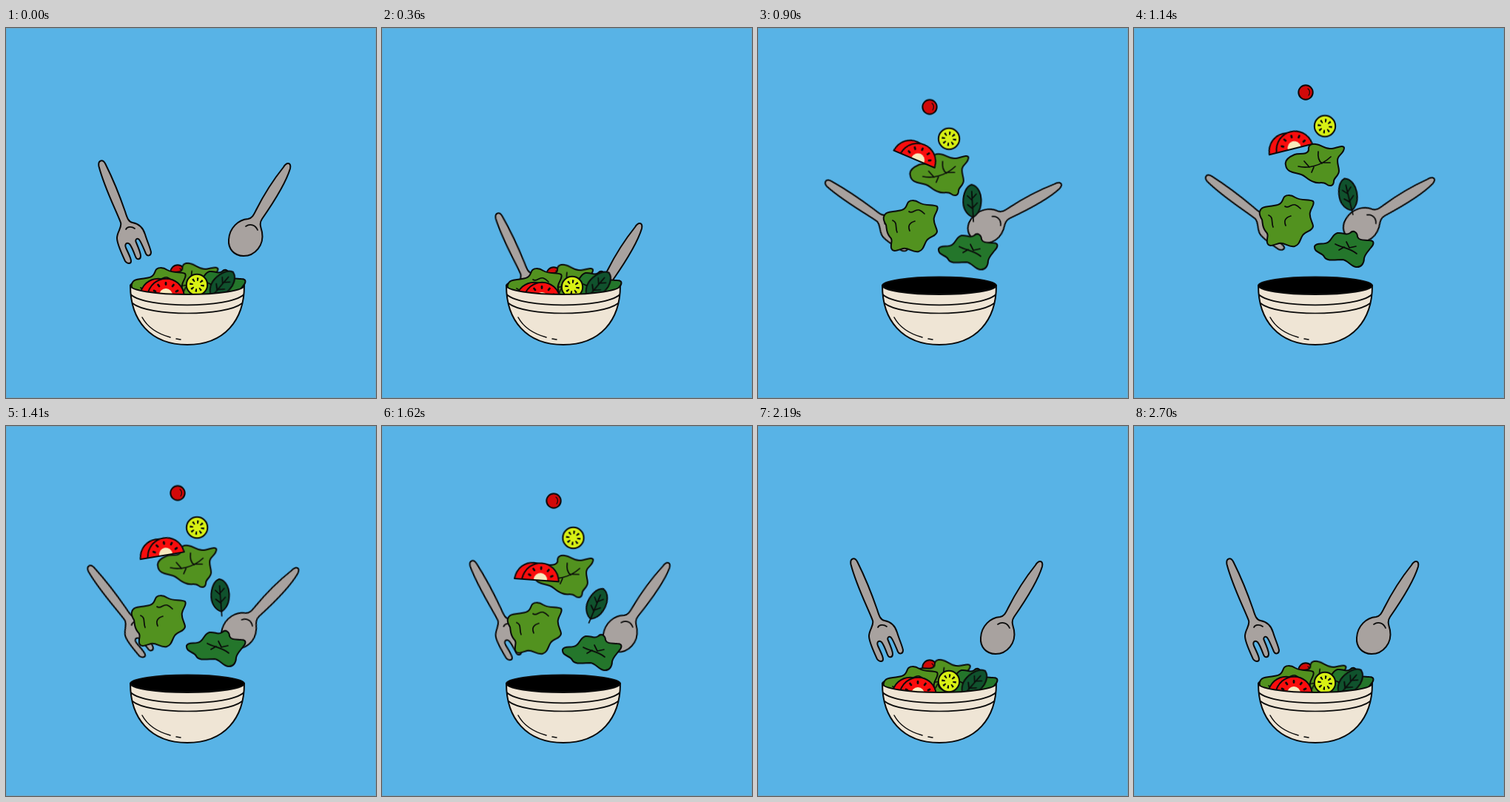
An HTML page for the animation above (2730 ms loop, 500x500 px).

```html
<!DOCTYPE html>
<html lang="en">
<head>
<meta charset="utf-8">
<title>Salad toss</title>
<style>
  html, body { margin: 0; width: 100%; height: 100%; overflow: hidden; background: #58b3e6; }
  svg { display: block; width: 100vw; height: 100vh; }
  .ink { stroke: #0a0a0a; stroke-width: 2; stroke-linejoin: round; stroke-linecap: round; }
  .line { fill: none; stroke-width: 1.7; }
  .steel { fill: #a8a29f; }
  .lettuce { fill: #52921f; }

  #fork { transform-origin: 127px 180px; animation: fork 2730ms infinite; }
  #spoon { transform-origin: 384px 183px; animation: spoon 2730ms infinite; }

  @keyframes fork {
    0% { transform: translate(0, 0) rotate(0deg); animation-timing-function: cubic-bezier(.4, 0, .65, .95); }
    13.19% { transform: translate(28px, 71px) rotate(-3deg); animation-timing-function: ease-in-out; }
    19.78% { transform: translate(27px, 69px) rotate(-8deg); animation-timing-function: cubic-bezier(.3, .1, .6, .8); }
    26.37% { transform: translate(-22px, 44px) rotate(-34deg); animation-timing-function: cubic-bezier(.2, .5, .5, 1); }
    32.97% { transform: translate(-36px, 28px) rotate(-34deg); animation-timing-function: cubic-bezier(.5, 0, .7, .55); }
    41.76% { transform: translate(-30px, 21px) rotate(-31deg); animation-timing-function: cubic-bezier(.35, .25, .65, .85); }
    59.34% { transform: translate(-7px, 3px) rotate(-6deg); animation-timing-function: ease-out; }
    65%, 100% { transform: translate(0, 0) rotate(0deg); }
  }
  @keyframes spoon {
    0% { transform: translate(0, 0) rotate(0deg); animation-timing-function: cubic-bezier(.4, 0, .65, .95); }
    13.19% { transform: translate(-33px, 81px) rotate(0deg); animation-timing-function: ease-in-out; }
    19.78% { transform: translate(-32px, 79px) rotate(6deg); animation-timing-function: cubic-bezier(.3, .1, .6, .8); }
    26.37% { transform: translate(13px, 47px) rotate(29deg); animation-timing-function: cubic-bezier(.2, .5, .5, 1); }
    32.97% { transform: translate(27px, 28px) rotate(30deg); animation-timing-function: cubic-bezier(.5, 0, .7, .55); }
    41.76% { transform: translate(23px, 21px) rotate(27deg); animation-timing-function: cubic-bezier(.35, .25, .65, .85); }
    59.34% { transform: translate(5px, 2px) rotate(4deg); animation-timing-function: ease-out; }
    65%, 100% { transform: translate(0, 0) rotate(0deg); }
  }

  /* One toss for all food; each piece brings its own poses. */
  .food { --end: var(--rest); animation: toss 2730ms infinite; }
  @keyframes toss {
    0% { transform: var(--rest); animation-timing-function: ease-in-out; }
    13.19% { transform: var(--dip); animation-timing-function: linear; }
    19.78% { transform: var(--dip); animation-timing-function: cubic-bezier(.3, .1, .65, .75); }
    26.37% { transform: var(--up); animation-timing-function: cubic-bezier(.2, .55, .45, 1); }
    41.76% { transform: var(--top); animation-timing-function: cubic-bezier(.5, 0, .92, .6); }
    59.34% { transform: var(--hang); animation-timing-function: cubic-bezier(.4, .12, .75, .57); }
    67.03% { transform: var(--drop); animation-timing-function: cubic-bezier(.3, .4, .7, .9); }
    72.53% { transform: var(--land); animation-timing-function: ease-in-out; }
    79.12% { transform: var(--hop); animation-timing-function: ease-in-out; }
    93.41%, 100% { transform: var(--end); }
  }
  #cherry {
    --rest: translate(232px, 330px);
    --dip: translate(232px, 333px);
    --up: translate(232px, 173.500px);
    --top: translate(232px, 87px);
    --hang: translate(232px, 101px);
    --drop: translate(233px, 181px);
    --land: translate(233px, 334px);
    --hop: translate(232px, 326px);
  }
  #mid {
    --rest: translate(244px, 345px) rotate(4deg);
    --dip: translate(243px, 347px) rotate(3deg);
    --up: translate(246px, 243px) rotate(-3deg);
    --top: translate(243px, 184px) rotate(0deg);
    --hang: translate(244px, 202px) rotate(1deg);
    --drop: translate(244px, 318px) rotate(-8deg);
    --land: translate(244px, 349px) rotate(2deg);
    --hop: translate(244px, 343px) rotate(5deg);
  }
  #left {
    --rest: translate(207px, 360px);
    --dip: translate(207px, 361px);
    --up: translate(207px, 293px);
    --top: translate(207px, 262px);
    --hang: translate(207px, 274.500px);
    --drop: translate(206px, 366px);
    --land: translate(207px, 358px);
    --hop: translate(207px, 361px);
  }
  #dark {
    --rest: translate(285px, 351px);
    --dip: translate(285px, 353px);
    --up: translate(285px, 314px);
    --top: translate(285px, 299px);
    --hang: translate(285px, 306px);
    --drop: translate(285px, 352px);
    --land: translate(285px, 350px);
    --hop: translate(285px, 352px);
  }
  #spinach {
    --rest: translate(292px, 346px) rotate(42deg);
    --dip: translate(292px, 347px) rotate(42deg);
    --up: translate(290px, 263px) rotate(33deg);
    --top: translate(289px, 225px) rotate(-12deg);
    --hang: translate(290px, 240px) rotate(24deg);
    --drop: translate(292px, 348px) rotate(35deg);
    --land: translate(292px, 345px) rotate(40deg);
    --hop: translate(292px, 347px) rotate(43deg);
  }
  #lime {
    --rest: translate(258px, 347px);
    --dip: translate(257px, 350px);
    --up: translate(258.500px, 208px);
    --top: translate(258px, 132.500px);
    --hang: translate(258.500px, 151px);
    --drop: translate(258px, 268px);
    --land: translate(258px, 351px);
    --hop: translate(258px, 345px);
  }
  #tomato {
    --rest: translate(211px, 362px) rotate(0deg);
    --dip: translate(211px, 367px) rotate(0deg);
    --up: translate(208px, 222px) rotate(-212deg);
    --top: translate(212px, 164px) rotate(-374deg);
    --hang: translate(209px, 208px) rotate(-356deg);
    --drop: translate(211px, 366px) rotate(-360deg);
    --land: translate(211px, 361px) rotate(-360deg);
    --hop: translate(211px, 363px) rotate(-360deg);
    --end: translate(211px, 362px) rotate(-360deg);
  }
</style>
</head>
<body>
<svg viewBox="0 0 500 500" class="ink">
  <rect x=".5" y=".5" width="499" height="499" fill="none" style="stroke:#6ba8c9;stroke-width:1"/>
  <ellipse cx="245" cy="348" rx="77" ry="11.5" fill="#000"/>

  <g id="fork">
    <path class="steel" d="M125.500 187C124 178 131 177 134.500 184C142 199 152 222 161 248C164 258 166 262 171 263C182 265 186 272 188 279C191 289 195 297 196 303C196 308 191 309 189 305C186 298 183 290 180 286C177 283 174 286 176 290C179 297 182 304 182 308C182 313 177 314 175 309C172 301 169 294 167 292C163 289 160 292 162 297C165 304 169 311 169 315C169 319 164 319 161 315C157 306 150 292 150 284C150 275 157 270 155 263C149 247 133 216 125.500 187Z"/>
    <path class="line" d="M162 272C164 268 170 268 174 271"/>
  </g>
  <g id="spoon">
    <path class="steel" d="M375 188C379 181 386 181 384 190C378 210 362 235 346 258C342 264 344 268 346 276C349 293 337 308 321 308C308 308 300 298 301 286C302 270 314 259 327 258C333 257 335 252 338 246C350 222 363 203 375 188Z"/>
    <path class="line" d="M324 268C330 264 337 266 340 273"/>
  </g>

  <g id="cherry" class="food">
    <circle r="9.7" fill="#d20909"/>
    <path class="line" style="stroke-width:1.200" d="M3-5C6-3 6 1 4 4"/>
  </g>
  <g id="mid" class="food">
    <g transform="translate(-243 -184)">
      <path class="lettuce" d="M205 185C203 178 210 174 217 171C224 169 234 172 236 165C235 158 240 156 246 157C254 158 258 164 266 163C272 163 283 157 284 162C284 168 278 171 276 175C273 180 277 187 277 193C277 200 270 202 270 207C270 213 265 215 260 211C255 207 249 211 243 208C235 206 232 200 226 198C218 195 206 196 205 185Z"/>
      <path class="line" d="M222 187C234 190 252 187 266 174M230 180L237 188M249 167C248 175 250 180 254 183M243 188L240 195M256 182L265 182"/>
    </g>
  </g>
  <g id="left" class="food">
    <g transform="translate(-207 -262)">
      <path class="lettuce" d="M170 248C172 240 181 242 189 240C199 239 200 235 202 230C204 225 212 225 218 229C226 234 236 231 242 234C245 238 239 243 238 249C236 256 242 263 242 268C241 275 232 274 228 280C224 286 224 293 217 295C209 297 203 289 196 291C189 293 182 297 180 290C179 283 183 280 178 275C173 269 174 263 173 259C170 254 169 251 170 248Z"/>
      <path class="line" d="M204 241C209 245 212 237 218 239C221 240 223 242 225 244M182 253C189 256 185 262 188 269M205 267C202 260 205 256 212 254"/>
    </g>
  </g>
  <g id="dark" class="food">
    <g transform="translate(-285 -299)">
      <path fill="#24762b" d="M244 295C247 289 257 294 263 289C268 285 268 279 275 277C283 276 286 281 292 277C297 272 302 277 302 282C304 288 312 286 318 287C326 287 324 293 320 297C316 302 312 306 311 311C311 318 307 324 300 323C293 322 289 314 282 313C273 313 260 316 257 309C254 303 243 304 244 295Z"/>
      <path class="line" d="M272 292C281 297 291 297 301 305M287 289L291 297L300 295M284 296L277 300"/>
    </g>
  </g>
  <g id="spinach" class="food">
    <path fill="#10522d" d="M0-22C9-20 14-8 12 4C11 14 5 20 1 22C-6 20-12 12-12 2C-12-10-7-20 0-22Z"/>
    <path class="line" d="M0-13L1 28M0-3L6-9M0-1L-6-7M1 9L7 3M1 11L-6 5"/>
  </g>
  <g id="lime" class="food">
    <circle r="14.2" fill="#d8f014"/>
    <circle class="line" r="7.5" style="stroke-width:4.500;stroke-linecap:butt" pathLength="8" stroke-dasharray=".36 .64"/>
  </g>
  <g id="tomato" class="food" fill="#f90d0d">
    <path d="M-30 0C-26-31 15-31 20 0Z"/>
    <path d="M-20 0C-15-31 26-31 30 0Z"/>
    <path fill="#f7e9bd" stroke="none" d="M-4-1A9 9 0 0 1 14-1Z"/>
    <path class="line" style="stroke-width:2.800" d="M-9-6l-2-1M-4-13l-1.500-2M5-15.500v-2M14-13l1.500-2M19-6l2-1"/>
  </g>

  <path fill="#efe5d5" d="M168 348A77 12 0 0 0 322 348C322 395 295 428 245 428C195 428 168 395 168 348Z"/>
  <path class="line" d="M169 360.500C190 379 300 379 321 360.500M171 372C193 390 297 390 319 372"/>
  <path class="line" style="stroke-width:1.500" d="M184 391C191 404 204 413 222 418M230 420L236 421"/>
</svg>
</body>
</html>
```
